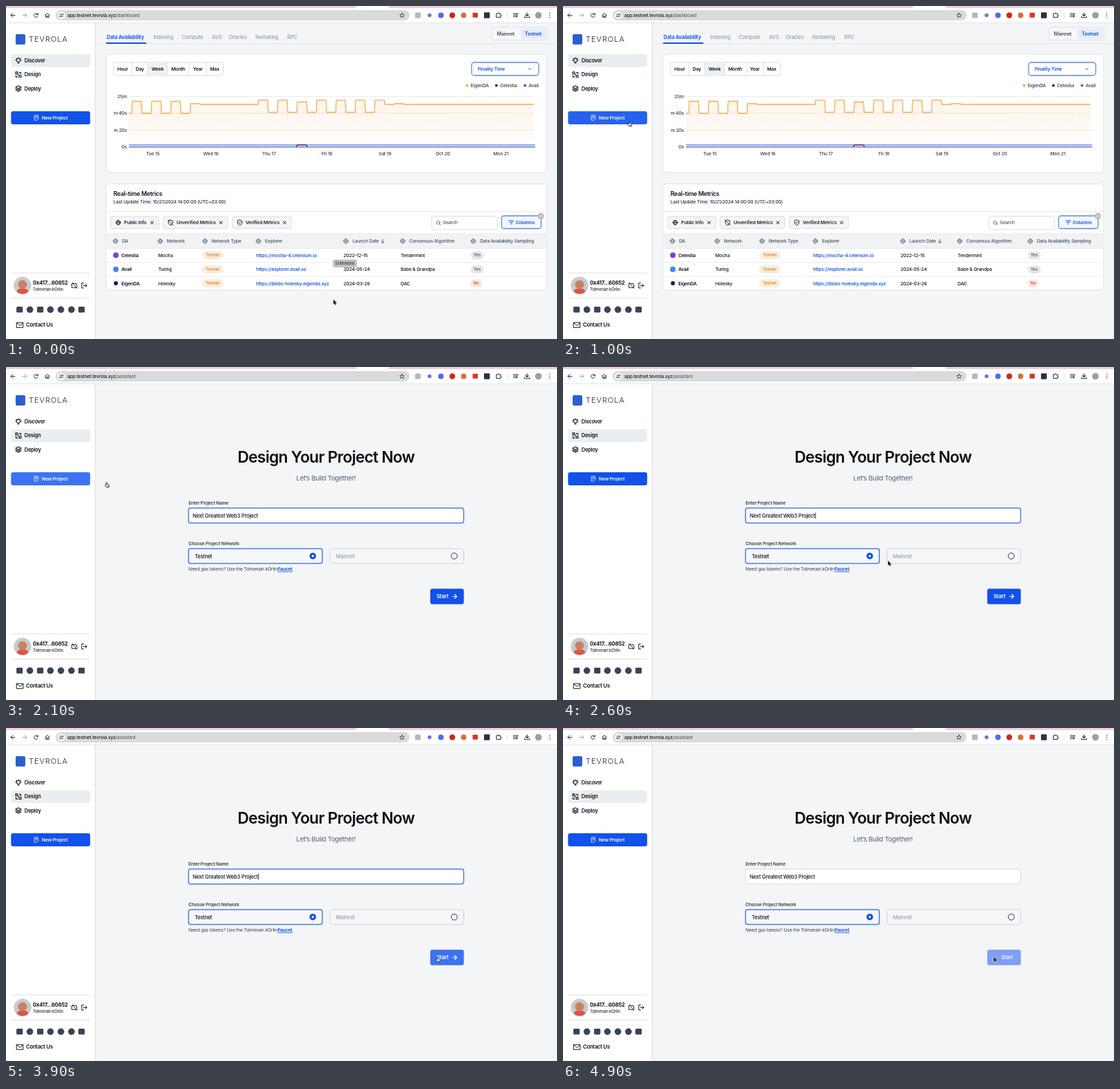
These frames come from a looping animation (800x484 px, 5000 ms). An HTML page with a canvas:

```html
<!DOCTYPE html>
<html lang="en">
<head>
<meta charset="utf-8">
<title>Project dashboard</title>
<style>
html, body { margin: 0; width: 100%; height: 100%; overflow: hidden; background: #fff; }
canvas { display: block; width: 800px; height: 484px; filter: blur(0.4px); }
</style>
</head>
<body>
<canvas id="stage"></canvas>
<script>
const W = 800, H = 484, LOOP = 5000, STEP = 100;
const BLUE = '#1251ea', INK = '#111419', GRAY = '#4a535f', PALE = '#98a0ac';
const LINE = '#dde1e6', PAGE = '#f3f5f7';
const canvas = document.getElementById('stage');
const ctx = canvas.getContext('2d');
const dpr = window.devicePixelRatio || 1;
canvas.width = W * dpr;
canvas.height = H * dpr;

const clamp = v => Math.max(0, Math.min(1, v));
const mix = (a, b, k) => a + (b - a) * k;

// Text is placed by its left (or aligned) x and the middle of its capitals.
function text(str, x, y, size = 6.8, weight = 500, color = INK, align = 'left', spacing = -0.03 * size) {
  ctx.font = `${weight} ${size}px Inter, "Open Sans", sans-serif`;
  ctx.letterSpacing = spacing + 'px';
  ctx.textAlign = align;
  ctx.fillStyle = color;
  ctx.fillText(str, x, y + size * 0.36);
  return ctx.measureText(str).width;
}

function box(x, y, w, h, r, fill, stroke, lw = 1) {
  ctx.beginPath();
  ctx.roundRect(x, y, w, h, r);
  if (fill) { ctx.fillStyle = fill; ctx.fill(); }
  if (stroke) { ctx.strokeStyle = stroke; ctx.lineWidth = lw; ctx.stroke(); }
}

function dot(x, y, r, fill, stroke, lw = 1) {
  box(x - r, y - r, 2 * r, 2 * r, r, fill, stroke, lw);
}

function icon(d, x, y, color = INK, lw = 1, fill) {
  const p = new Path2D(d);
  ctx.save();
  ctx.translate(x, y);
  ctx.lineJoin = ctx.lineCap = 'round';
  if (fill) { ctx.fillStyle = fill; ctx.fill(p); }
  ctx.strokeStyle = color;
  ctx.lineWidth = lw;
  ctx.stroke(p);
  ctx.restore();
}

const rule = (x1, x2, y, color = LINE, lw = 1) => icon(`M${x1} ${y}H${x2}`, 0, 0, color, lw);

const ICON = {
  back: 'M3 0H-3M0-3L-3 0L0 3',
  forward: 'M-3 0H3M0-3L3 0L0 3',
  reload: 'M2.6-1A2.8 2.8 0 1 0 2.6 1.2M2.8-3V-.9H.7',
  home: 'M-3-.3L0-3L3-.3M-2.3-.8V3H-.7V1H.7V3H2.3V-.8',
  tune: 'M-2.5-1.4H.2M2.4-1.4A.9 .9 0 1 0 2.4-1.3M2.5 1.5H-.2M-2.4 1.5A.9 .9 0 1 0-2.4 1.4',
  star: 'M0-3.3L1-1.1L3.3-.9L1.6 .7L2.1 3L0 1.8L-2.1 3L-1.6 .7L-3.3-.9L-1-1.1Z',
  puzzle: 'M-3-2H-1A1 1 0 0 1 1-2H3V0A1 1 0 0 1 3 2V3.5H-3Z',
  list: 'M-3.5-2.5H2M-3.5-.3H.5M-3.5 1.9H-1M2 1.8V-2.3H3.5M2 1.8A.9 .9 0 1 1 2 1.7',
  download: 'M0-3.8V1M-2.2-1L0 1.2L2.2-1M-3.6 1.5V3.3H3.6V1.5',
  bulb: 'M-1.2 2A2.7 2.7 0 1 1 1.2 2ZM-1 3.6H1M-4.2-.5H-3.6M4.2-.5H3.6M0-4.6V-4M-3.1-3.4L-2.7-3M3.1-3.4L2.7-3',
  design: 'M-4-3.8H-1.2V-1H-4ZM1.2 1H4V3.8H1.2ZM-1.4-1.2L1.4 1.2M1-3.2H3.6V-1M-3.6 1V3.4H-1',
  layers: 'M0-4L4-2L0 0L-4-2ZM-4 0L0 2L4 0M-4 2L0 4L4 2',
  form: 'M2.6 0V-3.5H-2.8V3.5H-.3M-1.2-1.6H1.2M-1.2 .2H.5M.8 3.4L3.6 .8',
  wallet: 'M-3.5-3H2.5V-1H3.5V3H-3.5ZM-3-4L3.2 4',
  exit: 'M-.8-3.6H-3.6V3.6H-.8M-1.2 0H3.8M1.8-2L3.8 0L1.8 2',
  mail: 'M-4.6-3.6H4.6V3.6H-4.6ZM-4.6-3L0 .7L4.6-3',
  chevron: 'M-2-1L0 1L2-1',
  globe: 'M3.3 0A3.3 3.3 0 1 1 3.3-.1M-3.3 0H3.3M0-3.3C-2-1.4-2 1.4 0 3.3C2 1.4 2-1.4 0-3.3',
  shield: 'M0-3.8L3.2-2.5V.2C3.2 2 1.5 3.2 0 3.9C-1.5 3.2-3.2 2-3.2 .2V-2.5Z',
  cross: 'M-2-2L2 2M2-2L-2 2',
  lens: 'M2 0A2.4 2.4 0 1 1 2-.1M1.4 1.5L3.1 3.2',
  filter: 'M-3.6-2.2H3.6M-2.2 .1H2.2M-.8 2.4H.8',
  down: 'M0-2.6V2.6M-2 .7L0 2.6L2 .7',
  arrow: 'M-2-3.5L-2 3L-.5 1.7L.6 4L1.7 3.5L.7 1.3L2.7 1.2Z',
  hand: 'M-1.4-3.6C-.8-4-.3-3.6-.3-3.1V-1.1L2.1-.7C2.8-.5 3 0 2.9 .6L2.5 3.3H-1.1L-3.1 .5C-3.4-.1-2.6-.6-2.1 0L-1.6 .5V-3Z'
};

function chrome(path) {
  box(0, 0, W, 24, 0, '#fff');
  box(0, 0, W, 3, 0, '#f0cce0');
  box(508, -4, 48, 8, 3, '#fff');
  rule(0, W, 24.5, '#e4e5e8');
  icon(ICON.back, 10, 13.5, '#333');
  icon(ICON.forward, 27, 13.5, '#aaa');
  icon(ICON.reload, 43.5, 13.5, '#333');
  icon(ICON.home, 60, 13.5, '#333');
  box(72, 6, 514, 15, 7.5, '#d9dadb');
  dot(80.5, 13.5, 5.5, '#f6f6f6');
  icon(ICON.tune, 80.5, 13.5, '#444', 0.9);
  const w = text('app.testnet.tevrola.xyz', 89, 13.5, 6.8, 500, '#1c1e21');
  text(path, 89 + w, 13.5, 6.8, 400, '#4a4d51');
  icon(ICON.star, 575, 13.5, '#444', 0.9);

  box(594, 9.5, 8, 8, 1.5, '#b4b7ba');
  dot(615, 13.5, 2.8, '#7a6de0');
  dot(631.5, 13.5, 4, '#4c6df0');
  dot(648, 13.5, 4.2, '#c82a22');
  dot(664.5, 13.5, 3.9, '#dc6d32');
  box(677.5, 9.8, 7.5, 7, 1, '#d8352c');
  box(694, 9.3, 8.4, 8.4, 1, '#2b3042');
  icon(ICON.puzzle, 715, 13, '#333', 1.1);
  icon('M0-3.5V3.5', 727.5, 13.5, '#d5d0d8', 0.8);
  icon(ICON.list, 740, 13.5, '#333');
  icon(ICON.download, 756.5, 13.5, '#333', 1.1);
  dot(773, 13.5, 4.8, '#9c9fa2');
  for (const dy of [-3, 0, 3]) dot(789.5, 13.5 + dy, 0.8, '#444');
}

function button(x, y, w, h, hover) {
  box(x, y, w, h, 3, `rgb(${mix(18, 60, hover)},${mix(81, 115, hover)},${mix(234, 241, hover)})`);
}

function sidebar(active, hover) {
  box(0, 25, 129, H - 25, 0, '#fff');
  icon('M129.5 25V484', 0, 0, '#dde1e6', 1.2);
  box(14, 41, 14, 15, 2, '#2b5fd0');
  text('TEVROLA', 33, 48.5, 11, 400, '#4c5563', 'left', 0.9);
  [['Discover', 'bulb'], ['Design', 'design'], ['Deploy', 'layers']].forEach(([name, ic], i) => {
    const y = 79.3 + i * 20.4;
    if (i === active) box(7.5, y - 9.3, 114.5, 18.6, 2.5, '#ebeef0');
    icon(ICON[ic], 18, y, INK, 1.1);
    text(name, 26.7, y, 7.5, 600);
  });
  button(7.3, 153, 114.9, 19, hover);
  icon(ICON.form, 44, 162.5, '#fff', 0.8);
  text('New Project', 52, 162.5, 6.8, 600, '#fff');

  ctx.setLineDash([1, 1.5]);
  rule(8, 122, 388, '#cfd4da');
  rule(8, 122, 424.5, '#cfd4da');
  ctx.setLineDash([]);
  dot(24, 406.3, 12.7, '#c8cacd');
  ctx.save();
  ctx.beginPath();
  ctx.arc(24, 406.3, 12.2, 0, 7);
  ctx.clip();
  box(15.5, 411, 17, 12, 5, '#dc5546');
  dot(24, 405, 6.5, '#c98163');
  ctx.restore();
  text('0x417...60852', 39, 402.3, 7.7, 700);
  text('Tolmerain kOrlin', 39, 412, 6, 500, '#2b3038');
  icon(ICON.wallet, 99.5, 406.3, INK, 0.9);
  icon(ICON.exit, 113.5, 406.3, INK, 1);

  const ink = '#394454';
  for (const x of [19.7, 49.7, 109.7]) box(x - 4.6, 437, 9.2, 8.6, 1.5, ink);
  for (const x of [34.7, 64.5, 79.7, 95]) dot(x, 441.3, 4.8, ink);
  icon(ICON.mail, 20.2, 463.7, INK, 1);
  text('Contact Us', 29, 463.7, 7.7, 600);
}

const stepX = k => 183 + 14.1 * k;

function finality(k) {
  if (k < 6) return k % 2 ? 156 : 138.5;
  if (k < 13 || k > 25) return k === 6 || k === 27 ? 142 : 143;
  return k % 2 ? (k === 17 ? 139.5 : 136.8) : 154.5;
}

function chart() {
  box(145, 70, 640, 172, 5, '#fff', LINE);
  box(156, 82, 159.5, 19, 3, '#fff', '#d6dbe1');
  box(206, 82.5, 28, 18, 0, '#eff1f3');
  for (const x of [183, 206, 234, 266, 291]) icon('M0 82V101', x, 0, '#d6dbe1', 0.9);
  [['Hour', 169.3], ['Day', 194.3], ['Week', 220], ['Month', 250], ['Year', 278.5], ['Max', 303]]
    .forEach(([s, x]) => text(s, x, 91.7, 6.8, 600, INK, 'center'));
  box(676, 82, 97.5, 19, 4, '#fff', '#5f88ef', 1.3);
  text('Finality Time', 685, 91.7, 6.8, 600, BLUE);
  icon(ICON.chevron, 760.5, 91.7, BLUE, 1);
  [['EigenDA', 669.5, '#f2ac4e'], ['Celestia', 712, '#37264f'], ['Avail', 753.5, '#2f6bea']]
    .forEach(([s, x, c]) => { dot(x, 115.5, 2, c); text(s, x + 5.3, 115.5, 6.8, 500, '#343a44'); });

  ctx.save();
  ctx.beginPath();
  ctx.rect(156, 110, 620, 120);
  ctx.clip();
  ['25m', '16m 40s', '8m 20s', '0s'].forEach((s, i) => {
    const y = 131.7 + i * 24.2;
    rule(179, 767, y, '#e6e8eb', 0.9);
    text(s, 175.5, y, 6.8, 500, '#343a44', 'right');
  });
  ctx.restore();
  ['Tue 15', 'Wed 16', 'Thu 17', 'Fri 18', 'Sat 19', 'Oct 20', 'Mon 21']
    .forEach((s, i) => text(s, 213.3 + i * 84.2, 215, 6.8, 500, '#343a44', 'center'));

  let d = 'M179 156';
  for (let k = 0, y = 156; k < 42; k++) {
    d += `L${stepX(k) - 0.4} ${y}`;
    y = finality(k);
    d += `L${stepX(k) + 0.4} ${y}`;
  }
  d += 'L766 143';
  const fade = ctx.createLinearGradient(0, 136, 0, 193);
  fade.addColorStop(0, 'rgba(240,170,80,.13)');
  fade.addColorStop(1, 'rgba(240,190,130,.06)');
  ctx.fillStyle = fade;
  ctx.fill(new Path2D(d + 'V193H179Z'));
  icon(d, 0, 0, '#f0ae58', 1.3);

  box(179, 201.5, 588, 3.5, 0, '#dce6fb');
  rule(179, 768, 201.8, '#5f8af0', 1.3);
  rule(179, 768, 205, '#45408f', 1.2);
  icon('M421.5 204.5L423 201.8H436L437.5 204.5', 0, 0, '#5a2547', 1.3);
}

function chip(x, w, ic, label, slashed) {
  box(x, 306, w, 17.5, 3, '#f4f5f7', '#d9dde2');
  icon(ICON[ic], x + 11, 314.8, INK, 0.9);
  if (slashed) icon('M-3.5-3.8L3.5 3.8', x + 11, 314.8, INK, 0.9);
  else if (ic === 'shield') icon('M-1.4 0L-.3 1.1L1.5-1', x + 11, 314.8, INK, 0.9);
  text(label, x + 19.5, 314.8, 6.8, 600, '#23272e');
  icon(ICON.cross, x + w - 10, 314.8, INK, 1);
}

const ROWS = [
  ['Celestia', 'Mocha', 'https://mocha-4.celenium.io', '2022-12-15', 'Tendermint', true, '#7443d6'],
  ['Avail', 'Turing', 'https://explorer.avail.so', '2024-05-24', 'Babe & Grandpa', true, '#3f86e8'],
  ['EigenDA', 'Holesky', 'https://blobs-holesky.eigenda.xyz', '2024-03-26', 'DAC', false, '#1d1a55']
];

function table() {
  box(145, 258.5, 640, 154.5, 5, '#fff', LINE);
  text('Real-time Metrics', 156, 273.3, 8.8, 600);
  text('Last Update Time: 10/21/2024 14:00:00 (UTC+03:00)', 156, 285, 6.8, 500, '#2b3038');
  rule(145.5, 784.5, 298.5, '#e6e9ed');
  chip(152, 70, 'globe', 'Public Info');
  chip(228, 94, 'shield', 'Unverified Metrics', true);
  chip(328.5, 86, 'shield', 'Verified Metrics');
  box(618, 305.5, 95.5, 19.5, 3, '#fff', '#d9dde2');
  icon(ICON.lens, 628, 315, GRAY, 0.9);
  text('Search', 634, 315, 6.8, 500, GRAY);
  box(719.5, 305, 57.5, 18.5, 3.5, '#f3f6fd', '#5f88ef', 1.3);
  icon(ICON.filter, 733.5, 314.3, BLUE, 1);
  text('Columns', 740, 314.3, 6.8, 600, BLUE);
  dot(776.5, 305.3, 4.6, '#b5b7bb');
  text('24', 776.5, 305.3, 4.5, 500, '#fff', 'center');

  box(145.5, 331, 639, 21, 0, '#f0f2f4');
  rule(145.5, 784.5, 331, '#e1e5e9', 0.8);
  rule(145.5, 784.5, 352.3, '#e1e5e9', 0.8);
  [['DA', 159], ['Network', 224], ['Network Type', 289], ['Explorer', 366.5], ['Launch Date', 493.5],
   ['Consensus Algorithm', 576], ['Data Availability Sampling', 678.5]].forEach(([s, x]) => {
    icon(ICON.globe, x, 341.8, '#5c6470', 0.8);
    text(s, x + 9.4, 341.8, 6.8, 500, GRAY);
  });
  icon(ICON.down, 547, 341.8, GRAY, 0.9);

  ROWS.forEach(([name, net, link, date, algo, sampled, color], i) => {
    const y = 362.3 + i * 20.4;
    if (i) rule(145.5, 784.5, y - 10, '#e6e9ed', 0.9);
    dot(159.5, y, i === 2 ? 3 : 4, color);
    text(name, 167.5, y, 6.8, 600);
    text(net, 221, y, 6.8, 500);
    box(285.5, y - 5, 29, 10, 5, '#fdf1e0', '#f6d9b2', 0.8);
    text('Testnet', 300, y, 6, 500, '#cf7b25', 'center');
    text(link, 363, y, 6.75, 600, '#1f5be8');
    text(date, 490, y, 6.8, 500);
    text(algo, 573, y, 6.8, 500);
    if (sampled) box(675.5, y - 5, 17.5, 10.5, 5, '#e6e8ec', '#d9dce1', 0.8);
    else box(675, y - 5, 15.5, 10, 5, '#fcebea', '#f6d3d1', 0.8);
    text(sampled ? 'Yes' : 'No', sampled ? 684 : 682.7, y, 6, 500, sampled ? GRAY : '#d43a34', 'center');
  });
}

function dashboard() {
  box(130, 25, 670, 460, 0, PAGE);
  rule(130, W, 54.5, '#e0e4e9');
  text('Data Availability', 146, 45, 7.5, 600, BLUE);
  [['Indexing', 214], ['Compute', 255], ['AVS', 299], ['Oracles', 323.5], ['Restaking', 362], ['RPC', 408.3]]
    .forEach(([s, x]) => text(s, x, 45, 7.5, 500, PALE));
  rule(146, 203, 54, BLUE, 1.8);
  box(705, 31, 81, 18.5, 4, '#f6f7f9', '#dde1e6');
  box(747.5, 33, 36.5, 14.5, 3, '#e6ebf5');
  text('Mainnet', 725.5, 40.3, 7, 500, '#343a44', 'center');
  text('Testnet', 765.3, 40.3, 7, 600, BLUE, 'center');
  chart();
  table();
}

function form(caret, hover, sent) {
  box(130, 25, 670, 460, 0, PAGE);
  text('Design Your Project Now', 464.7, 131, 22.8, 600, '#0c0e12', 'center');
  text('Let’s Build Together!', 464.7, 161.3, 9.6, 400, '#566070', 'center');
  text('Enter Project Name', 265, 197.5, 6.7, 500, '#23272e');
  box(265, 205, 399.5, 21.8, 3, '#fff', sent ? '#d3d8df' : '#4f7def', sent ? 1 : 1.5);
  text('Next Greatest Web3 Project', 271, 216, 7.6, 500);
  if (caret) icon('M0-4V4', 366.7, 216, INK, 0.8);
  text('Choose Project Network', 265, 256.3, 6.7, 500, '#23272e');
  box(265, 264, 194.3, 21.6, 3, '#f5f7fb', '#4f7def', 1.5);
  text('Testnet', 274, 274.8, 7.5, 500);
  dot(445.4, 274.7, 3.2, '#fff', BLUE, 3.2);
  box(470.5, 264, 194, 21.6, 3, '#f5f6f8', '#ccd2d9');
  text('Mainnet', 479, 274.8, 7.5, 500, PALE);
  dot(650.8, 274.7, 4.4, null, '#30353d', 1);
  text('Need gas tokens? Use the Tolmerain kOrlin', 265, 294, 6.75, 400, '#3a424d');
  const w = text('Faucet', 394.5, 294, 6.7, 700, BLUE);
  rule(394.5, 394.5 + w, 297.6, BLUE, 0.8);
  text('.', 394.7 + w, 294, 6.7, 400, '#444c58');
  if (sent) {
    box(616, 322.3, 48.7, 22.4, 3, '#7e9ff4');
    text('Start', 636, 333.5, 7.8, 600, '#f2f5fe');
  } else {
    button(616, 322.3, 48.7, 22.4, hover);
    text('Start', 625, 333.5, 7.8, 600, '#fff');
    icon(ICON.forward, 651.5, 333.5, '#fff', 1.1);
  }
}

// Pointer stops: time, x, y; the pointer eases out towards each one.
const STOPS = [
  [0, 477.5, 430.5], [100, 477.5, 430.5], [1000, 97, 171.5], [1400, 95, 168], [2000, 97, 168.5],
  [2100, 147, 171.5], [3200, 612.5, 333.5], [3700, 627.5, 336.5], [LOOP, 627.5, 336.5]
];

function pointer(t) {
  const i = Math.max(1, STOPS.findIndex(s => s[0] >= t));
  const [t0, x0, y0] = STOPS[i - 1], [t1, x1, y1] = STOPS[i];
  const k = 1 - (1 - (t - t0) / (t1 - t0)) ** 2;
  const x = mix(x0, x1, k), y = mix(y0, y1, k);
  const hand = (t >= 900 && t <= 2100) || (t >= 3700 && t < 4300);
  if (hand) {
    icon(ICON.hand, x, y, '#30343a', 0.9, '#fff');
    icon('M.2 1.2V2.5M1.5 1.4V2.5', x, y, '#30343a', 0.6);
  } else {
    icon(ICON.arrow, x, y, '#fff', 1.6);
    icon(ICON.arrow, x, y, '#15171a', 0.3, '#15171a');
  }
}

function draw(t) {
  ctx.setTransform(dpr, 0, 0, dpr, 0, 0);
  box(0, 0, W, H, 0, '#fff');
  const navHover = t < 1300 ? clamp((t - 900) / 200) : clamp((2300 - t) / 200);
  const loaded = t >= 1700;
  chrome(loaded ? '/assistant' : '/dashboard');
  if (loaded) {
    const sent = t >= 4300;
    form(!sent && t % 1000 >= 500, clamp((t - 3500) / 200), sent);
    sidebar(1, navHover);
  } else if (t < 1300) {
    dashboard();
    sidebar(0, navHover);
    if (t < 300) {
      box(475, 369, 34, 10.3, 1.5, '#bfc1c3', '#adb0b3', 0.6);
      text('Extensions', 492, 374.2, 5.6, 500, '#2b3038', 'center');
    }
  }
  pointer(t);
}

function tick(now) {
  const t = now % LOOP;
  draw(t - t % STEP);
  requestAnimationFrame(tick);
}
draw(0);
requestAnimationFrame(tick);
</script>
</body>
</html>
```
